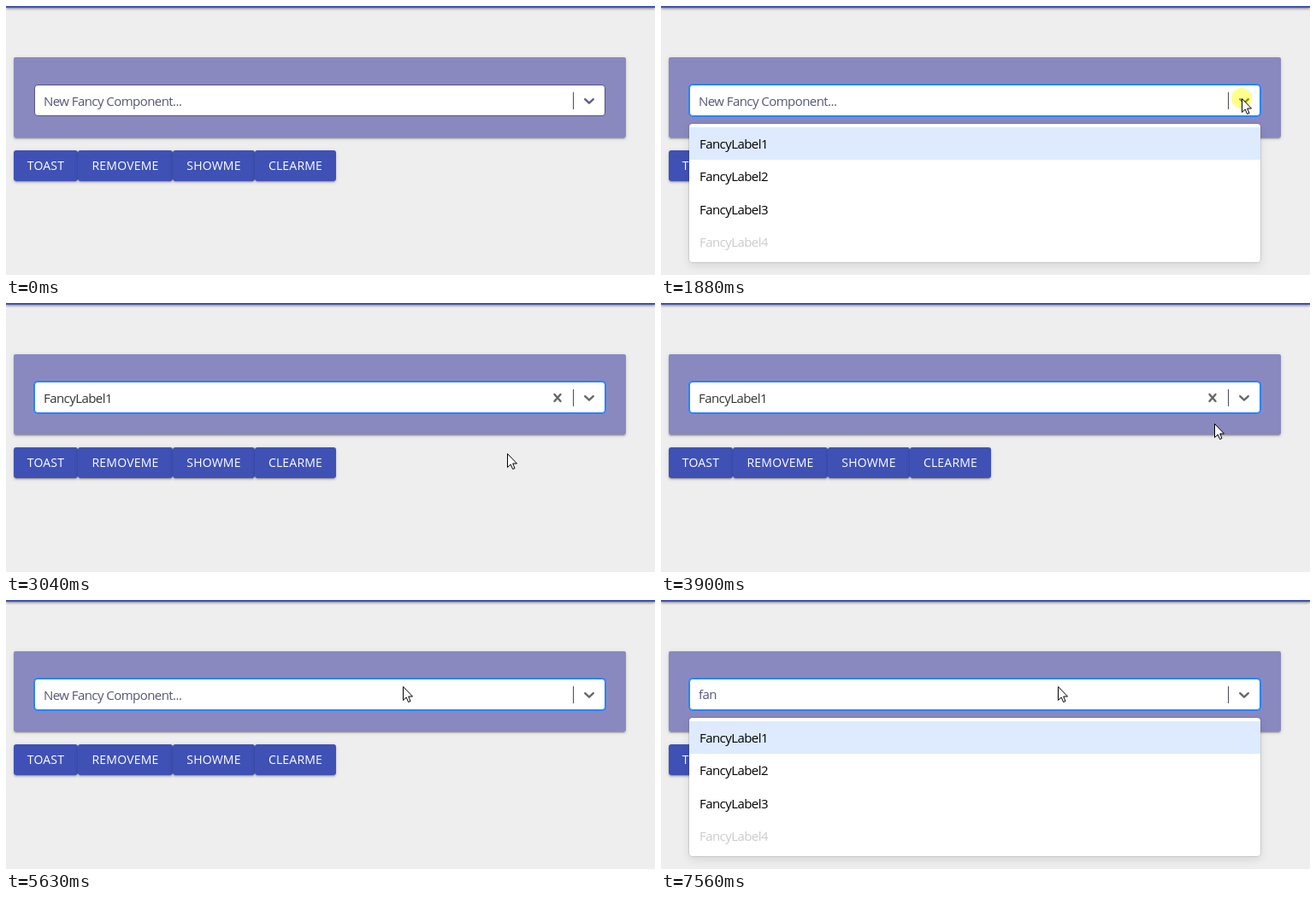
Recreate the animation shown at these times as an HTML page. Size 759 by 315 pixels, loop 8 s.

```html
<!DOCTYPE html>
<html lang="en">
<head>
<meta charset="utf-8">
<title>Fancy select</title>
<style>
html, body { margin: 0; width: 100%; height: 100%; overflow: hidden; background: #eee; }
body { position: relative; font: 15px "Open Sans", "Noto Sans", sans-serif; letter-spacing: -.56px; }
div, svg { position: absolute; box-sizing: border-box; white-space: pre; }
#bar { left: 0; top: -20px; width: 100%; height: 22px; background: #3f51b5;
  box-shadow: 0 1px 3px rgba(0,0,0,.5); }
#panel { left: 9px; top: 60px; width: 716px; height: 94px; border-radius: 2px; background: #8989c0;
  box-shadow: 0 3px 1px -2px rgba(0,0,0,.2), 0 2px 2px rgba(0,0,0,.14), 0 1px 5px rgba(0,0,0,.12); }
#buttons { left: 9px; top: 169px; display: flex; }
#buttons div { position: static; height: 36px; line-height: 36px; text-align: center; border-radius: 3px;
  background: #3f51b5; color: #fff; font-size: 14px; letter-spacing: .2px;
  box-shadow: 0 3px 1px -2px rgba(0,0,0,.2), 0 2px 2px rgba(0,0,0,.14), 0 1px 5px rgba(0,0,0,.12); }
#control { left: 33px; top: 92px; width: 668px; height: 37px; border: 1px solid #55557f;
  border-radius: 4px; background: #fff; }
#control.focus { border-color: #2684ff; box-shadow: 0 0 0 1px #2684ff; }
#text { left: 44px; top: 92px; line-height: 38px; }
#sep { left: 663px; top: 101px; width: 1px; height: 20px; background: #4c4c60; }
#caret { top: 100px; width: 1px; height: 20px; background: #333; }
#menu { left: 33px; top: 138px; width: 668px; height: 162px; padding-top: 4px; border-radius: 4px;
  background: #fff; box-shadow: 0 0 0 1px rgba(0,0,0,.1), 0 4px 11px rgba(0,0,0,.1); }
#menu div { position: static; height: 38.4px; line-height: 38.4px; padding-left: 12px; color: #000; }
#menu div:first-child { background: #deebff; }
#menu div:last-child { color: #ccc; }
#top { left: 0; top: 0; }
</style>
</head>
<body>
<div id="bar"></div>
<div id="panel"></div>
<div id="buttons">
  <div style="width:75px">TOAST</div><div style="width:111px">REMOVEME</div><div style="width:96px">SHOWME</div><div style="width:95px">CLEARME</div>
</div>
<div id="control"></div>
<div id="text"></div>
<div id="sep"></div>
<div id="caret"></div>
<div id="menu"></div>
<svg id="top" width="759" height="315">
  <g id="cross" transform="translate(645 111)" stroke-width="2.4" stroke-linecap="round">
    <path d="M-3.5-4L3.5 4M3.5-4L-3.5 4"/>
  </g>
  <path id="chevron" transform="translate(682 111)" d="M-4.8-1.9L0 2.7L4.8-1.9"
    fill="none" stroke-width="2.3" stroke-linecap="round" stroke-linejoin="round"/>
  <g id="pointer">
    <circle id="ring" r="12" fill="#ff0" opacity=".45"/>
    <path d="M.5.5V16.5L4.2 13L6.6 18.5L9 17.5L6.7 12H11.5Z" fill="#fff" stroke="#000" stroke-linejoin="round"/>
  </g>
</svg>
<script>
const LOOP = 8000, STEP = 77, RING = 120, BLINK = 1000;
const $ = id => document.getElementById(id);
const show = (el, on) => { el.style.display = on ? '' : 'none'; };
const label = n => 'FancyLabel' + n;

$('menu').innerHTML = [1, 2, 3, 4].map(n => `<div>${label(n)}</div>`).join('');

// Mouse presses and what follows them
const press = { open: 1820, pick: 2870, clear: 4800, reopen: 5650 };
const opened = press.open + 60, picked = press.pick + RING + 50;
const cleared = press.clear + 60, reopened = press.reopen + 60;
const keys = [6950, 7250, 7330];

// Pointer stops: departure, arrival, place
const stops = [
  { x: 360, y: 320 },
  { from: 250, to: 1020, x: 595, y: 119 },
  { from: 1100, to: 1250, x: 661, y: 112 },
  { from: 1420, to: 1650, x: 679, y: 108 },
  { from: 2200, to: 2580, x: 586, y: 176 },
  { from: 3360, to: 4130, x: 648, y: 128 },
  { from: 4200, to: 4520, x: 644, y: 114 },
  { from: 5240, to: 5560, x: 464, y: 101 }
];

// Moves in sampled steps: sideways slows down, vertical stays even
function pointerAt(t) {
  const i = stops.filter(s => s.from <= t).length;
  if (!i) return null;
  const a = stops[i - 1], b = stops[i];
  const n = Math.round((b.to - b.from) / STEP);
  const p = Math.min(1, (Math.floor((t - b.from) / (b.to - b.from) * n) + 1) / (n + 1));
  const ease = 1 - (1 - p) ** 3;
  return [Math.round(a.x + (b.x - a.x) * ease), Math.round(a.y + (b.y - a.y) * p)];
}

function draw(t) {
  const pos = pointerAt(t);
  show($('pointer'), pos);
  if (pos) $('pointer').setAttribute('transform', `translate(${pos})`);
  show($('ring'), Object.values(press).some(p => t >= p && t < p + RING));

  const focus = t >= opened;
  const open = focus && t < picked || t >= reopened;
  const filled = t >= picked && t < cleared;
  const typed = 'fan'.slice(0, keys.filter(k => k <= t).length);
  $('control').className = focus ? 'focus' : '';
  show($('menu'), open);

  const text = $('text');
  text.textContent = typed || (filled ? label(1) : 'New Fancy Component...');
  text.style.color = filled ? '#333' : '#55557a';
  text.style.marginTop = typed ? '-1px' : 0;
  $('caret').style.left = 44 + (typed ? text.offsetWidth : 0) + 'px';
  show($('caret'), open && (t + 60) % BLINK < BLINK / 2);

  show($('cross'), filled);
  $('cross').setAttribute('stroke', t >= 4200 ? '#333' : '#666');
  const hover = focus && pos[0] > 670;
  $('chevron').setAttribute('stroke', hover ? '#333' : focus ? '#666' : '#5c5c84');
}

const start = performance.now();
function tick() {
  draw((performance.now() - start) % LOOP);
  requestAnimationFrame(tick);
}
tick();
</script>
</body>
</html>
```
